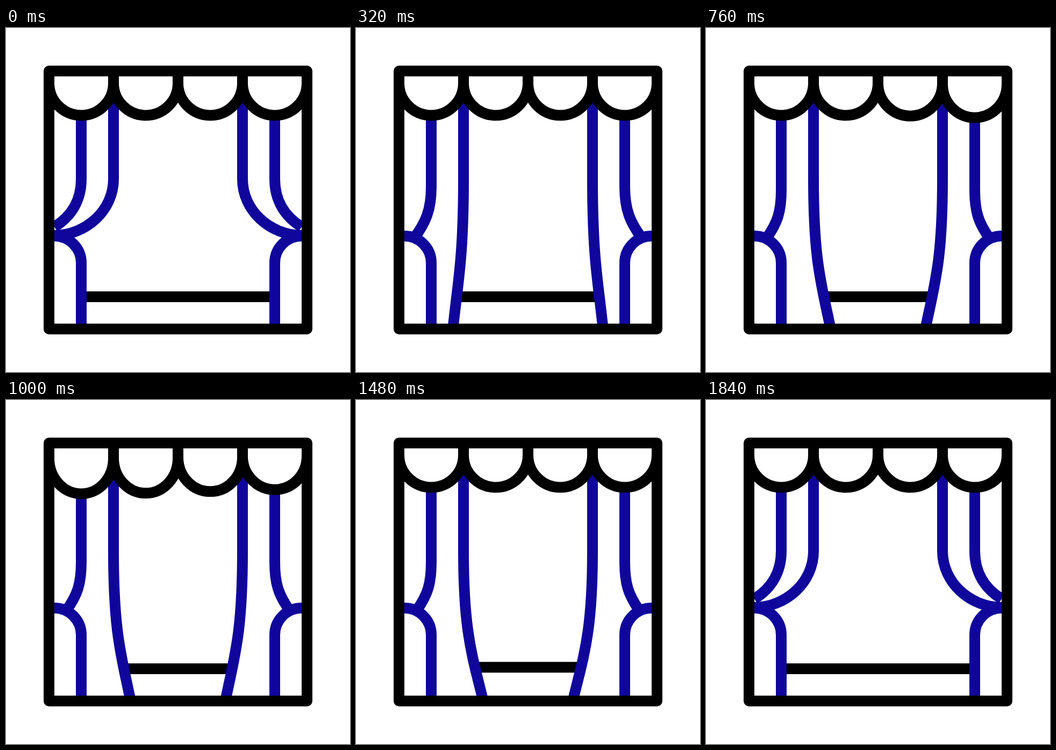
Write an HTML page that moves like this. It is 640x640 px and loops after 2000 ms.

```html
<!DOCTYPE html>
<html lang="en">
<head>
<meta charset="utf-8">
<title>Stage curtain</title>
<style>
  html, body { margin: 0; height: 100%; overflow: hidden; background: #fff; }
  svg { display: block; width: 100vw; height: 100vh; fill: none; stroke-width: 20; }
</style>
</head>
<body>
<svg viewBox="0 0 640 640">
  <path id="floor" stroke="#000"/>
  <g id="curtain" stroke="#10069b">
    <path id="edgeFill" fill="#fff" stroke="none"/>
    <path fill="#fff" stroke="none" d="M88 387H90A50 50 0 0 1 140 437V556H88Z"/>
    <path id="edge"/>
    <path id="fold"/>
    <path d="M86 387H90A50 50 0 0 1 140 437V556"/>
  </g>
  <use href="#curtain" transform="matrix(-1 0 0 1 640 0)"/>
  <path id="rays" stroke="#10069b" stroke-linecap="round"/>
  <path id="valance" fill="#fff" stroke="#000"/>
  <rect x="80" y="80" width="480" height="480" stroke="#000" stroke-linejoin="round"/>
</svg>
<script>
const LOOP = 2000, STEP = 40, REST = 1.87;
const setPath = (id, d) => document.getElementById(id).setAttribute("d", d);
const clamp = v => Math.max(0, Math.min(1, v));
const mix = (a, b, p) => a + (b - a) * p;
const ramp = (t, from, to) => clamp((t - from) / (to - from));

// 0 tied back, 1 hanging loose, 2 swung fully in.
const closing = t => ramp(t, 120, 240) + ramp(t, 240, 440) - (2 - REST) * ramp(t, 440, 680);
const opening = t => (2 - REST) * ramp(t, 1440, 1560) - ramp(t, 1560, 1720) - ramp(t, 1720, 1840);

// A strip hanging at x that bends below the knee towards its end.
const strip = (x, knee, bend, x2, y2, endX, endY) =>
  `M${x} 110V${knee}C${x} ${mix(knee, endY, bend)} ${x2} ${y2} ${endX} ${endY}`;

function drawCurtain(q) {
  const via = (a, b, c = b) => q < 1 ? mix(a, b, q) : mix(b, c, q - 1);

  const hemX = via(88, 138, 245), hemY = via(386, 556);
  const lean = (hemX - 200) * via(0.45, 0.68, 0.44);
  const edge = strip(200, 281, 0.55, 200 + lean, hemY - via(0, 80), hemX, hemY);
  setPath("edge", edge);
  setPath("edgeFill", edge + "H88V110Z");

  const tipX = via(90, 104, 114), tipY = via(370, 391);
  setPath("fold", strip(140, via(281, 290, 303), 0.45,
    tipX + via(31, 23, 20), tipY - via(19, 29), tipX, tipY));

  setPath("floor", `M130 ${500 - 8 * ramp(q, REST, 2)}H510`);
}

// The sag travels from the right scallop to the left one.
function scallop(i, t) {
  const sag = 6 * Math.sin(Math.PI * ramp(t, 800 - 40 * i, 1200 - 40 * i)) ** 2;
  return `M${80 + 120 * i} 80V${102.5 + sag}a60 ${60 + sag} 0 0 0 120 0V80`;
}

// Rays shoot up and outwards; side is -1, 0 or 1.
function ray(side, t) {
  const head = ramp(t, 340, 440), tail = ramp(t, 460, 580);
  if (head <= 0 || tail >= 1) return "";
  const at = p => `${320 + side * mix(36, 53, p)} ${mix(456, 425 + 8 * Math.abs(side), p)}`;
  return `M${at(tail)}L${at(head)}`;
}

function draw(t) {
  drawCurtain(closing(t) + opening(t));
  setPath("rays", [-1, 0, 1].map(side => ray(side, t)).join(""));
  setPath("valance", [0, 1, 2, 3].map(i => scallop(i, t)).join(""));
}

const start = performance.now();
function tick() {
  const t = (performance.now() - start) % LOOP;
  draw(Math.floor(t / STEP) * STEP);
  requestAnimationFrame(tick);
}
tick();
</script>
</body>
</html>
```
